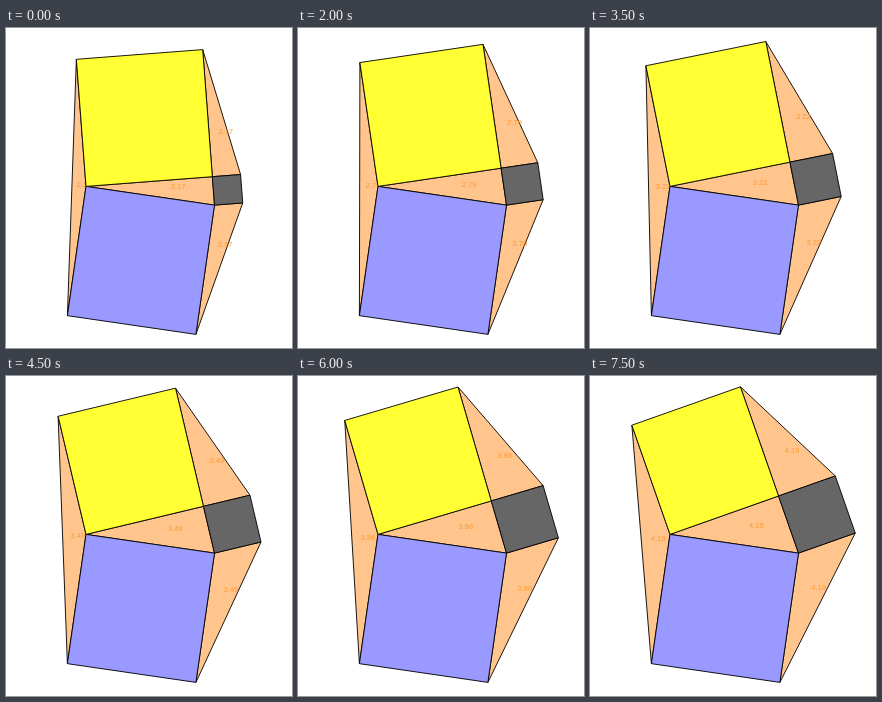
Recreate the animation shown at these times as an HTML page with a canvas. Size 286 by 320 pixels, loop 8 s.

```html
<!DOCTYPE html>
<html lang="en">
<head>
<meta charset="utf-8">
<title>Squares on a right triangle</title>
<style>
html, body { margin: 0; width: 286px; height: 320px; overflow: hidden; background: #fff; }
canvas { display: block; }
</style>
</head>
<body>
<canvas width="286" height="320"></canvas>
<script>
const ctx = document.querySelector('canvas').getContext('2d');
const LOOP = 8000, STEP = 500;
const ORIGIN = { x: 80, y: 158.4 }, STRETCH = 1.006;
const A = [0, 0], B = [128.5, 18.6];
const SIDE = Math.hypot(...B), TILT = Math.atan2(B[1], B[0]);
const MAX_AREA = 5.1;

const add = (p, q) => [p[0] + q[0], p[1] + q[1]];
const turn = (p, q) => [p[1] - q[1], q[0] - p[0]]; // edge p→q rotated a quarter turn
const square = (p, q) => [p, q, add(q, turn(p, q)), add(p, turn(p, q))];
const toStage = ([x, y]) => [ORIGIN.x + x, ORIGIN.y + y * STRETCH];

function polygon(points, fill) {
  ctx.beginPath();
  points.forEach(p => ctx.lineTo(...toStage(p)));
  ctx.closePath();
  ctx.fillStyle = fill;
  ctx.fill();
  ctx.stroke();
}

function label(points, text) {
  const sum = points.reduce(add);
  ctx.fillStyle = '#f93';
  ctx.fillText(text, ...toStage([sum[0] / 3, sum[1] / 3]));
}

function draw(time) {
  const step = Math.floor(time % LOOP / STEP);
  const angle = (12.6 + step) * Math.PI / 180;
  const reach = SIDE * Math.cos(angle);
  const C = [reach * Math.cos(angle - TILT), -reach * Math.sin(angle - TILT)];

  const blue = square(A, B), gray = square(B, C), yellow = square(C, A);
  const triangles = [
    [A, B, C],
    [A, blue[3], yellow[2]],
    [B, blue[2], gray[3]],
    [C, gray[2], yellow[3]]
  ];
  const area = (MAX_AREA * Math.sin(2 * angle)).toFixed(2);

  ctx.fillStyle = '#fff';
  ctx.fillRect(0, 0, 286, 320);
  ctx.strokeStyle = '#000';
  ctx.lineWidth = 0.9;
  ctx.lineJoin = 'round';
  ctx.font = '7.5px "Liberation Sans", Arial, sans-serif';
  triangles.forEach(t => polygon(t, '#ffc58c'));
  triangles.forEach(t => label(t, area));
  polygon(blue, '#99f');
  polygon(gray, '#666');
  polygon(yellow, '#ff3');
}

function frame() {
  draw(performance.now());
  requestAnimationFrame(frame);
}
frame();
</script>
</body>
</html>
```
